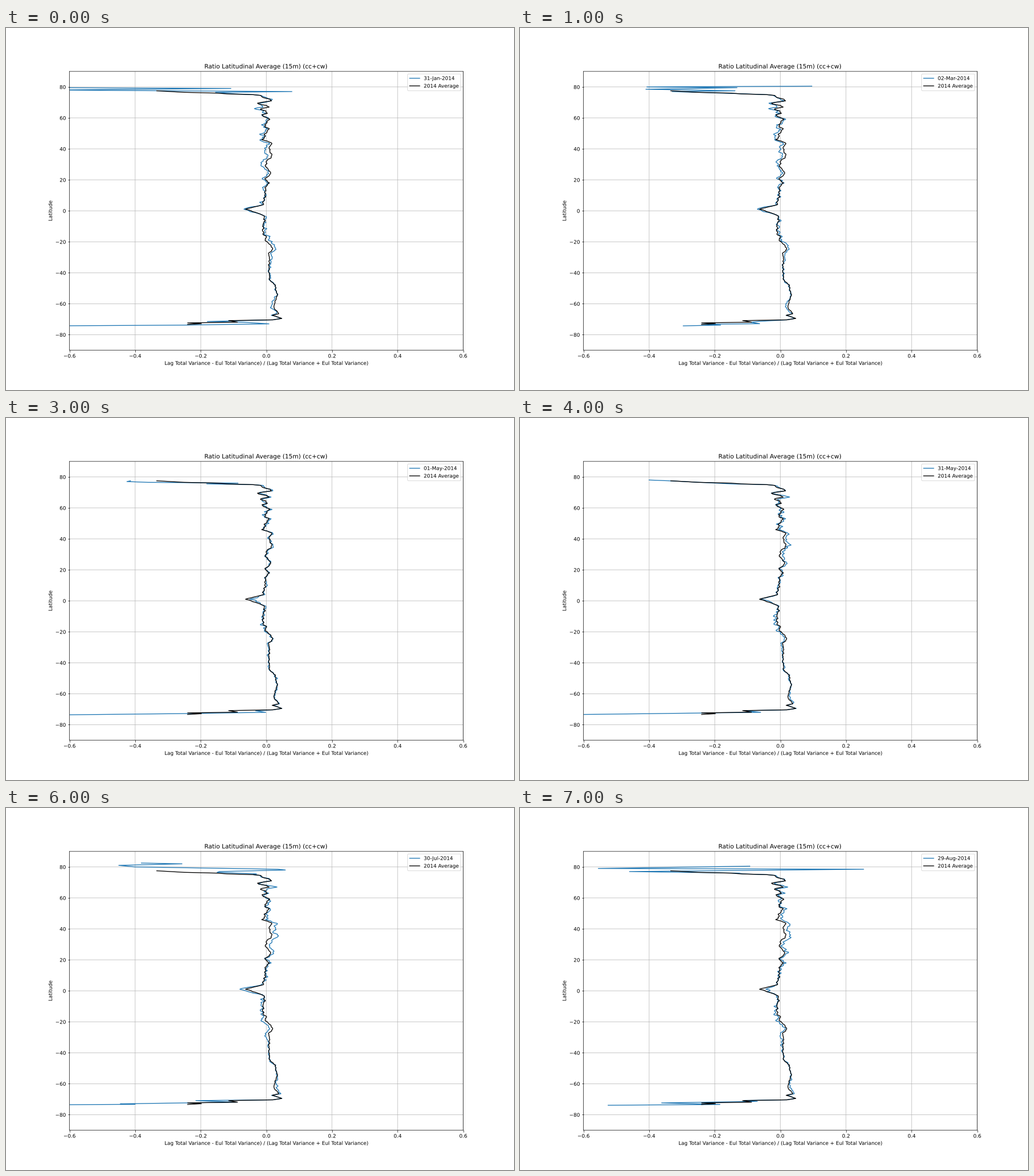
Write a matplotlib script that moves like this. It is 885 px wide and 632 px high and loops after 8 s.

```python
import numpy as np
import matplotlib.pyplot as plt
from matplotlib.animation import FuncAnimation
from matplotlib.patheffects import Normal

DPI = 63.2
W, H = 885, 632

# Knots are (latitude, ratio * 1000) from north to south.
AVERAGE = [
    (74.5, -18), (73, 3), (71, 13), (69.5, -33), (67, 9), (66, -14), (63, 2),
    (62, -15), (59, 11), (56.5, -2), (54, -8), (53, 11), (51, -3), (46, -9),
    (44, 17), (40, 8), (36, 17), (30, -2), (24, 13), (21, -4), (18, 9),
    (15, -5), (9, -4), (4, -10), (1, -62), (-2, -18), (-4, -4), (-11, -12),
    (-20, 2), (-24, 19), (-28, 8), (-44, 8), (-48, 26), (-55, 32), (-63, 22),
    (-66.5, 38), (-67.5, 18), (-69.8, 51)]
AVERAGE_NORTH = [(77.5, -334), (76.5, -250), (76, -150), (75.5, -120)]
AVERAGE_SOUTH = [(-70.9, -115), (-71.9, -88), (-72.4, -240), (-72.9, -198), (-73.4, -240)]

# Date, shift of the equatorial dip, turning points of both polar tails.
DATES = [
    ("31-Jan-2014", -12,
     [(79.5, -650), (79, -108), (78, -660), (77, 78), (76.5, -155), (75.5, -95)],
     [(-71.5, -180), (-72, -68), (-73, 8), (-73.8, -250), (-74.3, -650)]),
    ("02-Mar-2014", -11,
     [(80.5, 96), (80, -407), (79.5, -132), (78.5, -410), (77.5, -138), (77, -330),
      (75.5, -105)],
     [(-71.4, -64), (-72, -90), (-72.9, -63), (-73.3, -240), (-73.8, -182), (-74.3, -296)]),
    ("01-Apr-2014", 3,
     [(78.5, -640), (78, -330), (75.5, -140)],
     [(-71.5, -50), (-74.5, -640)]),
    ("01-May-2014", 18,
     [(77.5, -414), (77, -425), (76.5, -360), (76, -86), (75.5, -182)],
     [(-71, -33), (-72, -2), (-72.8, -240), (-73.7, -640)]),
    ("31-May-2014", 9,
     [(78, -400), (77.5, -340), (75.5, -150)],
     [(-71, -110), (-72, -60), (-73.5, -640)]),
    ("30-Jun-2014", 0,
     [(79, -640), (78.5, -365), (77.5, -253), (77, -380), (75.5, -125)],
     [(-70.9, -180), (-71.9, -90), (-73.3, -535)]),
    ("30-Jul-2014", -20,
     [(82.5, -381), (82, -257), (81, -450), (80, -400), (78.5, 35), (78, 58),
      (77, -143), (76.5, -150), (75.5, -30)],
     [(-70.9, -215), (-71.9, -90), (-73, -445), (-73.3, -400), (-73.6, -640)]),
    ("29-Aug-2014", 20,
     [(80.5, -93), (79, -555), (78.5, 254), (77, -460), (76, -125), (75.5, -115)],
     [(-70.8, -110), (-71.4, -70), (-72.4, -362), (-73.4, -184), (-73.9, -525)]),
]

LAT = np.arange(74.5, -70, -0.5)
rng = np.random.default_rng(14)


def jitter(size):
    """Slightly smoothed noise, rougher towards the north."""
    noise = np.convolve(rng.normal(0, size, LAT.size), [0.3, 0.8, 0.3], "same")
    return noise * (1 + 0.5 * (LAT > 45) - 0.4 * (LAT < -20))


def bump(centre, width):
    return np.exp(-((LAT - centre) / width) ** 2)


def curve(north, core, south):
    """Join the tails to the core; returns ratio and latitude."""
    knots = np.vstack([north, (75, -40), np.column_stack([LAT, core]), (-70.4, 20), south])
    return knots[:, 1] / 1000, knots[:, 0]


def seasonal(i):
    """Offset from the average: the hemispheres swing in opposite phase."""
    season = -np.cos(2 * np.pi * (i + 0.3) / 12)
    swing = (15 * bump(36, 16) + 22 * bump(66.5, 1.5)
             - 10 * bump(-22, 13) + 8 * bump(-62, 5))
    return season * swing + DATES[i][1] * bump(1, 2)


knot_lat, knot_ratio = np.array(AVERAGE[::-1], float).T
core = np.interp(LAT, knot_lat, knot_ratio) + jitter(2.5)
monthly = [curve(north, core + seasonal(i) + jitter(3.5), south)
           for i, (_, _, north, south) in enumerate(DATES)]

# Outlined text and unsnapped lines keep sub-pixel positions.
plt.rcParams.update({"font.family": "DejaVu Sans", "path.snap": False,
                     "path.effects": [Normal()]})
# The tiny margin keeps the pixel size from rounding down.
fig, ax = plt.subplots(figsize=((W + 0.01) / DPI, (H + 0.01) / DPI), dpi=DPI)
line, = ax.plot([], [], color="tab:blue", label=DATES[0][0])
ax.plot(*curve(AVERAGE_NORTH, core, AVERAGE_SOUTH), color="black", label="2014 Average")
ax.set_xlim(-0.6, 0.6)
ax.set_ylim(-90, 90)
ax.set_yticks(range(-80, 81, 20))
ax.grid(True)
ax.set_title("Ratio Latitudinal Average (15m) (cc+cw)")
ax.set_xlabel("Lag Total Variance - Eul Total Variance) / (Lag Total Variance + Eul Total Variance)")
ax.set_ylabel("Latitude")
date_text = ax.legend(loc="upper right").get_texts()[0]


def update(i):
    line.set_data(*monthly[i])
    date_text.set_text(DATES[i][0])
    return line, date_text


anim = FuncAnimation(fig, update, frames=len(DATES), interval=1000, repeat=True, repeat_delay=0)
plt.show()
```
